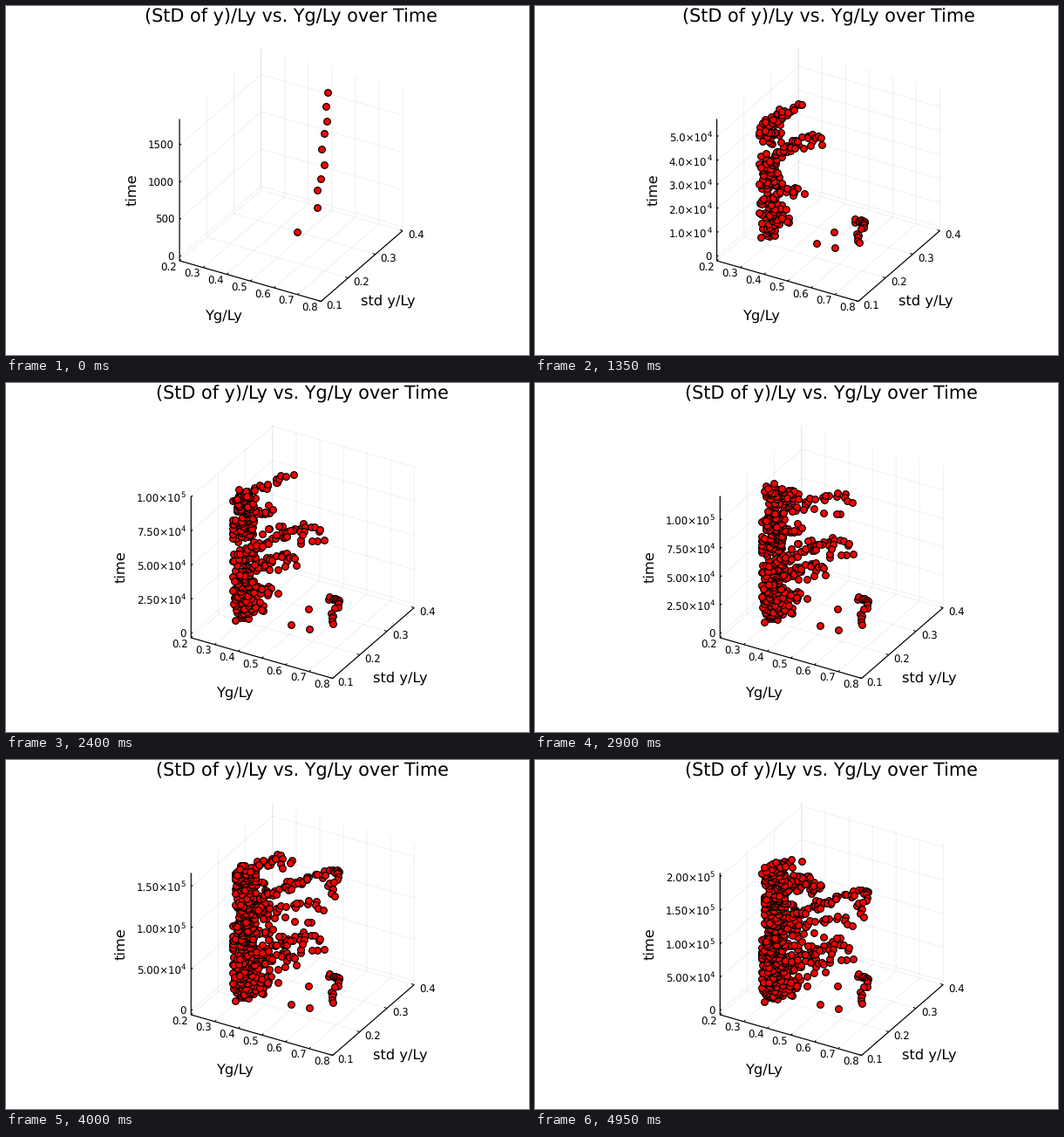
A matplotlib script that plays this animation: 600x400 px, repeating every 5000 ms.

```python
import numpy as np
import matplotlib.pyplot as plt
from matplotlib.animation import FuncAnimation
from matplotlib.collections import LineCollection

plt.rcParams["font.family"] = "DejaVu Sans"
plt.rcParams["text.hinting"] = "none"

PT = 0.72                                  # points per pixel
FRAMES, STEP_MS, PER_FRAME, DT = 100, 50, 10, 200
FLOOR = 292
EX = np.array([162.4, 46.5])               # screen vectors of the three axes
EY = np.array([93.6, -81.0])
EZ = np.array([0.0, -162.5])
TITLE, GUIDE, TICK, SUP = 20.75, 16.2, 11.7, 8.6   # font sizes in pixels

# Excursions from the column: first, peak and last sample, reach in pixels
BURSTS = [(45, 53, 57, 18), (72, 76, 80, 14), (96, 111, 120, 32),
          (178, 212, 217, 60), (260, 298, 314, 88), (385, 395, 403, 28),
          (470, 499, 507, 90), (512, 530, 545, 22), (550, 562, 575, 16),
          (588, 641, 657, 100), (676, 690, 700, 16), (780, 808, 868, 50),
          (985, 999, 1010, 24)]


def hook(count, rng):
    """The curl on the far right: along the top, then down and inward."""
    s = np.linspace(0, 1, count)
    stations = [0, 0.2, 0.5, 0.7, 0.78, 1]
    right = np.interp(s, stations, [159, 166, 170, 168, 161, 163])
    down = np.interp(s, stations, [-40, -38, -36, -26, -19, -6])
    return np.column_stack([right, down]) + rng.normal(0, 1.2, (count, 2))


def make_path():
    """Floor offset (right, down) of every sample."""
    rng = np.random.default_rng(12)
    i = np.arange(FRAMES * PER_FRAME)
    lift = np.zeros(i.size)
    sag = np.zeros(i.size)
    for first, peak, last, reach in BURSTS:
        rise = ((i - first) / (peak - first)).clip(0, 1) ** 1.3
        fall = ((last - i) / (last - peak)).clip(0, 1)
        lift += reach * rise * fall
        sag += 0.25 * reach * np.exp(-((i - peak - 2) / 4) ** 2)
    spread = np.where(lift < 22, 6.5, 3.5)
    right = 61 + lift + spread * rng.normal(size=i.size).clip(-2, 2)
    right = np.maximum(right, 48)
    down = -13.5 - 0.25 * (right - 60) + sag
    down += 3 * rng.normal(size=i.size).clip(-2, 2)
    path = np.column_stack([right, down])
    path[1:20] = hook(19, rng)
    path[641:657] = hook(16, rng)
    path[[0, 20, 21]] = (134.7, -28), (135.8, 0.7), (114.8, -3.7)
    return path


PATH = make_path()
TIMES = DT * np.arange(len(PATH))


def choose_ticks(lo, hi):
    """Score round steps by count, coverage and niceness; first best wins."""
    span = hi - lo
    nice = [(5.0, 0.9), (3.0, 0.2), (2.5, 0.5), (2.0, 0.7), (1.0, 1.0)]
    best, ticks = -1.0, []
    for power in (5, 4, 3, 2):
        for q, quality in nice:
            step = q * 10.0 ** power
            count = int(hi // step) + 1
            if not 4 <= count <= 8:
                continue
            grain = 1 - abs(count - 5) / 5
            cover = 1.5 * span / ((count - 1) * step)
            score = 1 / 4 * grain + 1 / 6 * 1.0 + 1 / 3 * cover + 1 / 4 * quality
            if score > best:
                best, ticks = score, [k * step for k in range(count)]
    return ticks


def tick_labels(ticks):
    """Return (text, exponent) pairs and the widest label in pixels."""
    digit = 0.636 * TICK
    if ticks[-1] <= 1e4:
        labels = [(f"{t:.0f}", "") for t in ticks]
        return labels, digit * len(labels[-1][0])
    parts = []
    for t in ticks[1:]:
        power = int(np.floor(np.log10(t) + 1e-9))
        parts.append((t / 10 ** power, power))
    places = 1 + max(len(f"{m:g}".partition(".")[2]) for m, _ in parts)
    labels = [("0", "")] + [(f"{m:.{places}f}×10", str(p)) for m, p in parts]
    return labels, digit * (places + 3) + 1.156 * TICK + 0.636 * SUP


fig = plt.figure(figsize=(6, 4), dpi=100, facecolor="white")
ax = fig.add_axes([0, 0, 1, 1])


def write(x, y, text, size, ha="center", **kw):
    ax.text(x, y, text, fontsize=size * PT, ha=ha, va="baseline",
            color="black", **kw)


def lines(segments, width, z, **kw):
    ax.add_collection(LineCollection(segments, linewidths=width * PT,
                                     zorder=z, **kw), autolim=False)


def draw(n):
    ax.clear()
    ax.set_xlim(0, 600)
    ax.set_ylim(400, 0)
    ax.axis("off")

    count = PER_FRAME * (n + 1)
    half = float(TIMES[count - 1]) / 2
    lo, hi = half - half * 1.06, half + half * 1.06
    ticks = choose_ticks(lo, hi)
    labels, width = tick_labels(ticks)
    left = 184.2 + width / 2
    origin = np.array([left, FLOOR])

    def at(u, v, w):
        return origin + u * EX + v * EY + w * EZ

    us = np.arange(7) / 6
    vs = np.arange(4) / 3
    ws = [(t - lo) / (hi - lo) for t in ticks]

    grid = [[at(u, 0, 0), at(u, 1, 0), at(u, 1, 1)] for u in us]
    grid += [[at(1, v, 0), at(0, v, 0), at(0, v, 1)] for v in vs]
    grid += [[at(0, 0, w), at(0, 1, w), at(1, 1, w)] for w in ws]
    lines(grid, 0.8, 1, colors="black", alpha=0.07)

    frame = [[at(0, 0, 1), at(0, 0, 0), at(1, 0, 0), at(1, 1, 0)]]
    lines(frame, 1.2, 2, colors="black")
    marks = [[at(u, 0, 0), at(u, 0.02, 0)] for u in us]
    marks += [[at(1, v, 0), at(0.98, v, 0)] for v in vs]
    marks += [[at(0, 0, w), at(0, 0.02, w)] for w in ws]
    lines(marks, 1, 2, colors="black")

    for k, u in enumerate(us):
        x, y = at(u, 0, 0)
        write(x - 12.5, y + 11.4, f"0.{k + 2}", TICK)
    for k, v in enumerate(vs):
        x, y = at(1, v, 0)
        write(x + 15, y + 9, f"0.{k + 1}", TICK)
    for w, (text, power) in zip(ws, labels):
        x, y = at(0, 0, w) + (-6, 4.2)
        if power:
            y += 1.8
            write(x, y - 6.2, power, SUP, "right")
            x -= 0.636 * SUP
        write(x, y, text, TICK, "right")

    write(left + 128, 18.2, "(StD of y)/Ly vs. Yg/Ly over Time", TITLE)
    write(left + 50.5, 360.3, "Yg/Ly", GUIDE)
    write(left + 239.5, 343, "std y/Ly", GUIDE)
    write(left - width - 19.5, 210.5, "time", GUIDE, rotation=90,
          rotation_mode="anchor")

    rise = (TIMES[:count] - lo) / (hi - lo)
    spots = origin + PATH[:count] + rise[:, None] * EZ
    ax.scatter(*spots.T, s=(7.7 * PT) ** 2, c="red", edgecolors="black",
               linewidths=1.2 * PT, zorder=3, snap=False)
    return []


anim = FuncAnimation(fig, draw, frames=FRAMES, interval=STEP_MS,
                     init_func=lambda: [], repeat=True, repeat_delay=0,
                     blit=False)
plt.show()
```
